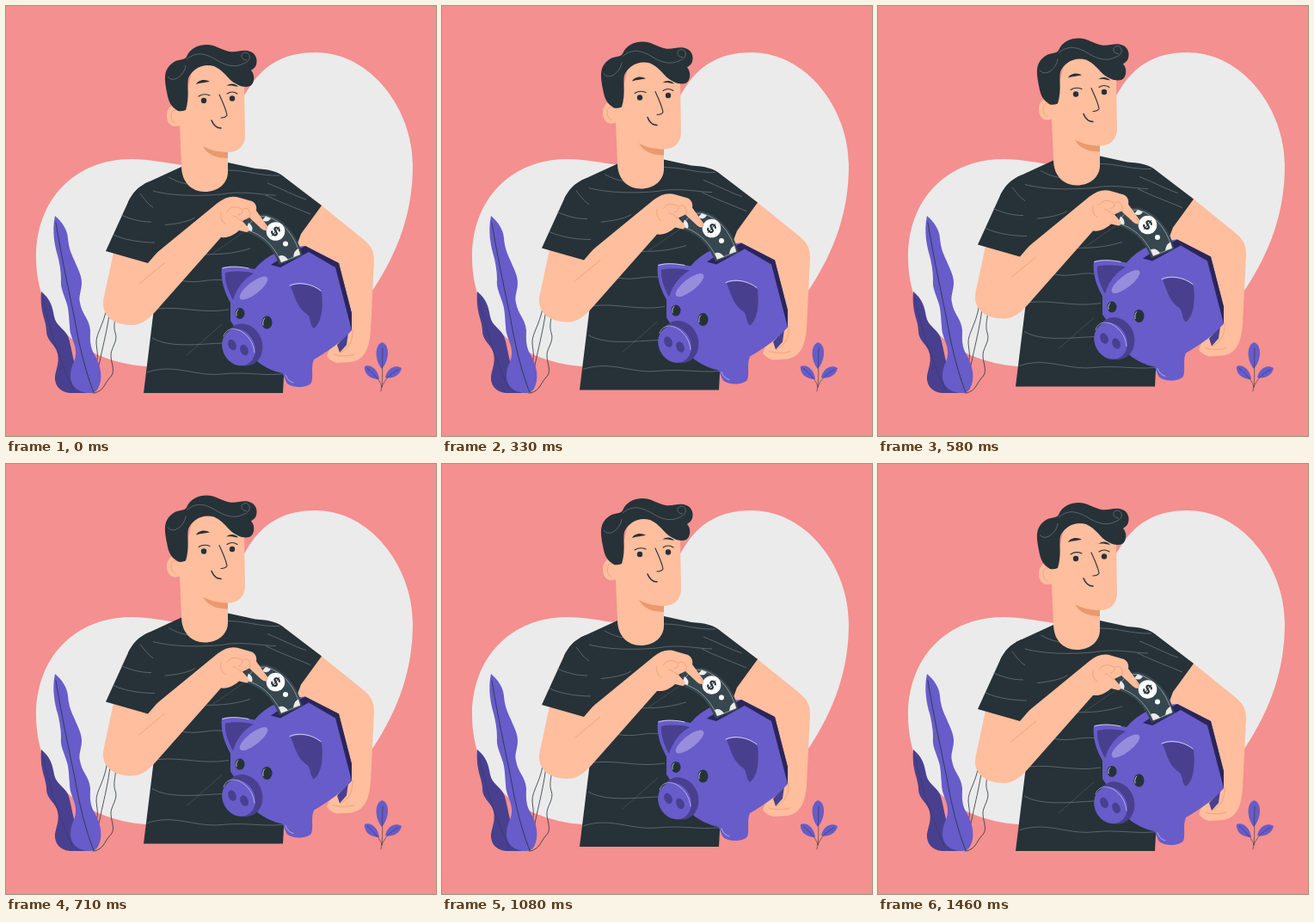
These frames come from a looping animation (500 px wide and 500 px high, 1500 ms). An HTML page:

```html
<!DOCTYPE html>
<html lang="en">
<head>
<meta charset="utf-8">
<title>Saving money</title>
<style>
  html, body { margin: 0; width: 100%; height: 100%; overflow: hidden; background: #f4908f; }
  svg { display: block; width: 100%; height: 100%; }
  .skin { fill: #ffbe9d; }
  .dark { fill: #263238; }
  .purple { fill: #675cc9; }
  .shade { fill: #48408f; }
  .line { fill: none; stroke: #263238; stroke-width: .8; stroke-linecap: round; stroke-linejoin: round; }
  .face { stroke-width: 1.1; }
  .smile { stroke-width: 1.5; }
  .crease { fill: none; stroke: #eb996e; stroke-width: .7; stroke-linecap: round; }
  .stripe { fill: none; stroke: #7d888d; stroke-width: .6; }
  .shine { fill: none; stroke: #fff; stroke-width: .7; stroke-linecap: round; }
</style>
</head>
<body>
<svg viewBox="0 0 500 500">
  <path fill="#ebebeb" d="M146 178C80 178 35 225 35 292C35 370 90 413 162 419C260 428 370 415 428 328C456 285 473 240 473 185C473 120 424 54 360 54C318 54 297 73 282 96C260 130 245 188 205 185C184 182 166 178 146 178Z"/>

  <g id="vines" class="line">
    <path d="M118 340C118 365 104 380 105 392C106 403 108 408 104 418C100 429 101 438 101 450"/>
    <path d="M122 340C120 375 110 400 102 450"/>
    <path d="M129 340C128 365 124 370 127 380C131 390 121 398 122 408C123 418 128 426 120 433C114 440 114 447 103 450"/>
  </g>

  <g id="leaves">
    <path class="shade" d="M41 332C52 341 54 350 56 361C58 372 68 375 72 384C77 396 78 425 94 450L74 450C62 449 56 440 57 430C59 420 63 412 59 401C55 392 47 388 47 378C47 365 39 357 41 332Z"/>
    <path class="purple" d="M57 244C66 252 71 260 72 270C73 282 76 288 80 297C85 309 88 314 88 322C88 331 84 337 86 345C88 358 97 364 98 377C98 386 97 392 101 402C107 412 112 424 110 436C108 445 105 450 98 450C84 450 74 442 75 428C76 416 82 412 81 401C80 390 74 384 74 372C73 360 73 352 70 344C67 334 63 328 64 318C64 308 62 298 60 290C57 280 53 262 57 244Z"/>
    <path class="line" d="M58 252C65 295 74 335 80 365C86 400 94 430 102 449"/>
    <path class="line" d="M43 340C50 375 62 410 78 446" opacity=".4"/>
  </g>

  <g id="sprig">
    <path class="purple" d="M437 391C447 394 446 412 437 422C429 412 428 395 437 391ZM417 419C425 416 433 424 434 434C424 434 416 428 417 419ZM460 421C458 430 449 434 441 432C443 422 452 416 460 421Z"/>
    <path class="line" opacity=".7" d="M438 398C437 420 439 435 436 448M420 421C430 430 436 437 437 443M456 423C446 428 440 435 437 443"/>
  </g>

  <g id="saver">
    <path class="skin" d="M362 228L414 270C424 278 428 284 428 296L424 378C422 401 416 411 402 414L385 415Q377 413 373 407L380 390L350 300L335 270Z"/>
    <path class="crease" d="M403 376C404 388 399 398 389 403M405 405C397 408 387 407 380 405"/>
    <path class="dark" d="M204 187L167 204C153 210 147 218 142 228L160 298L176 300L172 352L160 450H322L330 300L343 265L367 232L325 200C316 192 306 190 290 189L258 182Z"/>

    <g class="stripe">
      <path d="M189 199C198 204 205 206 211 207M164 213C190 222 228 221 250 219C275 214 298 220 314 220"/>
      <path d="M258 191C280 191 296 198 318 197M304 206C322 213 336 221 349 225M302 220C318 228 335 234 354 242"/>
      <path d="M172 256C190 254 208 253 220 246M213 290C235 287 250 292 284 282M202 319C225 324 235 316 254 319"/>
      <path d="M176 352C205 349 228 358 259 353M170 386C190 398 225 393 252 392M164 426C195 415 220 431 250 428S295 430 321 428"/>
      <path d="M210 406L251 370M278 262C260 274 248 283 240 288" opacity=".5"/>
    </g>

    <g id="head">
      <path class="skin" d="M207 112C201 114 187 113 187 128C187 139 196 142 202 139L204 186C204 205 216 216 231 216C247 216 258 206 258 193V170C270 170 277 163 278 152L277 90L262 62L220 62Z"/>
      <path d="M229 163C238 168 248 170 258 170V177C245 177 234 173 229 163Z" fill="#eb996e"/>
      <path class="crease" d="M198 121C190 119 190 134 197 136"/>
      <path class="dark" d="M200 122C192 117 189 112 187 100C184 84 183 74 194 66C200 61 207 64 210 59C214 49 224 45 233 45C244 45 252 52 260 53C268 54 273 51 281 52C290 54 293 61 291 68C290 72 287 73 285 75C290 80 289 90 284 93C277 96 268 92 261 86C256 81 251 74 242 70C228 66 216 74 212 84C210 92 214 105 209 121Q204 123 200 122Z"/>
      <path class="stripe" d="M210 62C222 52 232 56 242 61C255 70 267 72 276 67C284 65 286 56 279 54C272 54 272 63 280 63M188 82C194 91 208 80 209 69"/>
      <path class="dark" d="M221 91C224 85 233 85 237 88C232 89 227 89 221 91ZM256 93C261 89 267 90 270 94C265 93 260 92 256 93Z"/>
      <circle class="dark" cx="230" cy="110" r="3.2"/>
      <circle class="dark" cx="263" cy="107.5" r="3.2"/>
      <path class="line face" d="M224 105Q230 101 237 104M257 102Q263 98 269 102M248 103C252 112 256 120 257 127Q255 130 250 130"/>
      <path class="line smile" d="M239 133C241 138 245 142 250 142"/>
    </g>

    <g id="pig">
      <path class="shade" d="M385 394L398 380L396 394L388 403Z"/>
      <path class="purple" d="M251 304C263 301 280 304 289 306C303 289 325 280 348 279L387 299L402 358V377C392 389 374 402 358 411C354 420 358 431 355 438C351 444 334 445 327 439C324 434 324 431 321 427C311 425 301 420 293 414L261 366V345C254 333 249 317 251 304Z"/>
      <path d="M348 279L387 299L402 357V377L383 304L352 286L319 304L308 301L317 295Z" fill="#2b2558"/>
      <path class="shade" d="M255 310C266 308 278 308 288 311C276 318 268 328 264 342C258 331 254 320 255 310Z"/>
      <path class="shade" d="M331 326C342 321 360 324 367 333C369 352 367 368 358 375C352 370 356 361 348 357C338 349 336 338 331 326Z"/>
      <path class="shine" d="M330 325C340 320 356 323 366 331M252 305C260 302 273 303 282 305"/>
      <ellipse cx="288" cy="328" rx="20" ry="7" transform="rotate(-38 288 328)" fill="#968edb"/>
      <ellipse class="dark" cx="272" cy="357.5" rx="5.5" ry="6.5"/>
      <ellipse class="dark" cx="303.5" cy="368" rx="6" ry="7.5"/>
      <path class="shine" d="M268 360Q267 355 270 353M299 371Q298 365 301 363"/>
      <ellipse class="shade" cx="276.500" cy="394" rx="21.5" ry="25" transform="rotate(-20 276.500 394)"/>
      <ellipse class="purple" cx="270.500" cy="397" rx="18.5" ry="22" transform="rotate(-28 270.500 397)"/>
      <path class="shine" d="M253 384C256 374 267 373 276 380C284 386 288 394 289 403" opacity=".7"/>
      <ellipse class="shade" cx="263" cy="394" rx="4.5" ry="6.5" transform="rotate(-25 263 394)"/>
      <ellipse class="shade" cx="277" cy="400" rx="4.5" ry="6.5" transform="rotate(-25 277 400)"/>
      <path class="shine" d="M325 429Q327 436 334 438" opacity=".7"/>
    </g>

    <g id="bill">
      <path d="M288 243L303 242C324 248 338 265 345 290L318 301C311 284 300 268 275 262L278 249Z" fill="#37474f"/>
      <path class="shine" d="M290 245L302 244.500C322 250 335 266 342 289L320 298C313 282 301 266 279 260Z" opacity=".6"/>
      <path d="M342 289L334 292Q335 284 340 282ZM320 298L328 295Q323 288 317 291ZM302 244.500L308 247Q304 253 298 249ZM279 260L282 252Q288 256 286 262Z" fill="#ebebeb"/>
      <circle cx="313.500" cy="262" r="10.8" fill="#fff"/>
      <circle cx="325" cy="276.500" r="3" fill="#fff"/>
      <text x="313.500" y="267.500" transform="rotate(40 313.500 262)" text-anchor="middle" font-family="Inter, sans-serif" font-size="15" font-weight="700" fill="#263238">$</text>
    </g>

    <g id="arm">
      <path class="skin" d="M126 282L114 338C109 356 121 371 146 371C157 371 165 365 174 355L250 269C259 270 265 266 271 261L280 263Q285 261 281 257L275 250L283 246L297 259C302 263 306 260 304 256L291 238C292 233 290 229 286 227L272 223C263 220 255 222 246 229L163 297Z"/>
      <path class="crease" d="M155 323L184 299M257 239C262 232 268 233 274 236C277 239 273 243 270 243M276 236C280 234 285 236 284 246M264 244C270 245 272 251 275 250M250 240C249 247 251 251 255 253M300 254Q303 255 303 259"/>
      <path class="dark" d="M167 204C153 210 147 218 142 228L116 285L165 299L190 270Z"/>
      <path class="stripe" d="M134 243C148 249 158 251 169 251M125 266C140 273 160 275 173 275M156 218C162 226 166 231 171 234"/>
    </g>
  </g>
</svg>
<script>
  const LOOP = 1500, LIFT = 8.5;
  const saver = document.getElementById("saver");

  function draw(now) {
    const phase = now % LOOP / LOOP * 2 * Math.PI;
    const y = -LIFT * (1 - Math.cos(phase)) / 2;
    saver.setAttribute("transform", `translate(0 ${y.toFixed(2)})`);
    requestAnimationFrame(draw);
  }
  draw(performance.now());
</script>
</body>
</html>
```
